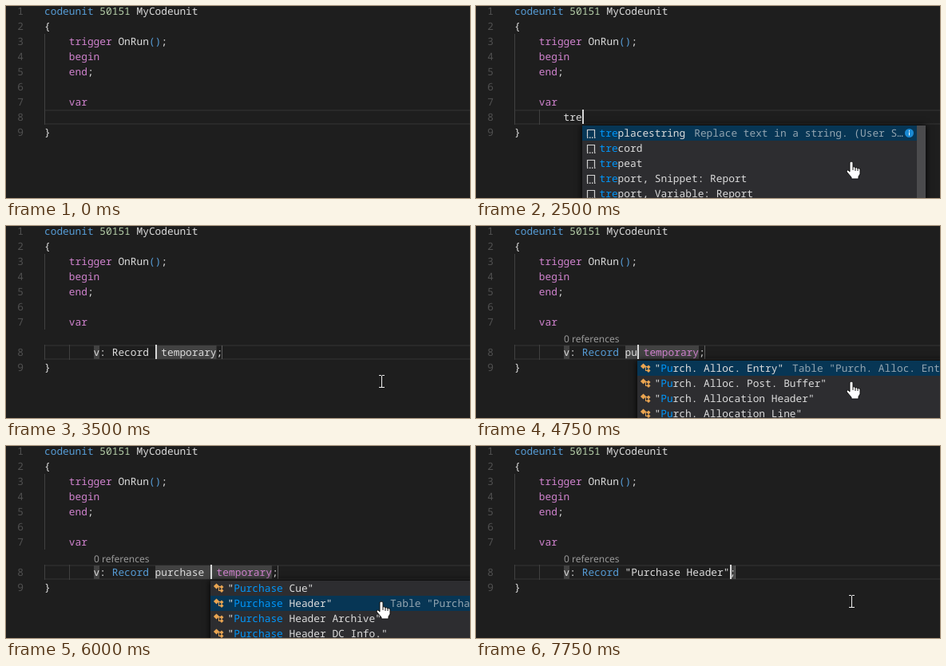
Animation, 581 px wide and 241 px high, one loop 8 s. Source, as an HTML page with a canvas:

```html
<!DOCTYPE html>
<html lang="en">
<head>
<meta charset="utf-8">
<title>Code editor snippet</title>
<style>
html, body { margin: 0; width: 100%; height: 100%; overflow: hidden; background: #1e1e1e; }
canvas { display: block; width: 581px; height: 241px; }
</style>
</head>
<body>
<canvas id="stage"></canvas>
<script>
const W = 581, H = 241, LOOP = 8000, STEP = 250;
const CHAR = 7.7, LEFT = 48, ROW = 19;
const MONO = '12.83px "Noto Sans Mono", "DejaVu Sans Mono", monospace';
const SANS = '12px "Noto Sans", "Open Sans", sans-serif';
const C = {
  bg: '#1e1e1e', text: '#dcdcdc', blue: '#569cd6', pink: '#d183cf', num: '#b5cea8',
  gutter: '#505050', guide: '#404040', line: '#292929', stop: '#424242',
  popup: '#2d2d30', pick: '#073655', match: '#0097fb', detail: '#93a5b1'
};

const canvas = document.getElementById('stage');
const ctx = canvas.getContext('2d');
const ratio = window.devicePixelRatio || 1;
canvas.width = W * ratio;
canvas.height = H * ratio;
ctx.scale(ratio, ratio);

const colX = col => LEFT + col * CHAR;
const rowY = n => ROW * (n - 1) - 3;

function rect(x, y, w, h, color) {
  ctx.fillStyle = color;
  ctx.fillRect(x, y, w, h);
}

function text(str, x, y, color, font = MONO) {
  ctx.font = font;
  ctx.fillStyle = color;
  ctx.fillText(str, x, y);
}

// Draws [string, color] runs on the character grid.
function runs(parts, x, y) {
  for (const [str, color] of parts) {
    text(str, x, y, color);
    x += str.length * CHAR;
  }
}

const snippets = [
  ['treplacestring', 'Replace text in a string. (User S…'],
  ['trecord'], ['trepeat'], ['treport, Snippet: Report'], ['treport, Variable: Report']
];
const keywords = [['var'], ['Variant'], ['Version'], ['Visible']];
const quoted = names => names.map(n => [`"${n}"`, `Table "${n}"`]);
const alloc = quoted(['Purch. Alloc. Entry', 'Purch. Alloc. Post. Buffer',
  'Purch. Allocation Header', 'Purch. Allocation Line']);
const purchase = quoted(['Purchase Cue', 'Purchase Header',
  'Purchase Header Archive', 'Purchase Header DC Info.']);

const typed = (str, items) => ({ word: str, caret: 8 + str.length, popup: { items, match: str.length } });
const record = o => ({ name: 'v', table: '', tail: ' temporary', moved: true, tinted: true, ...o });
const search = (str, items, pick = 0) => record({
  table: str, caret: 18 + str.length, lens: true, stop: true,
  popup: { items, match: str.length, pick, skip: 1, table: true }
});
const HEADER = '"Purchase Header"';
const done = o => record({ table: HEADER, caret: 18 + HEADER.length, lens: true, ...o });

const timeline = [
  [0, { word: '' }],
  [2250, typed('tr', snippets)],
  [2500, typed('tre', snippets)],
  [2750, record({ name: '', caret: 8, tinted: false, stop: true })],
  [3250, record({ caret: 9, tinted: false, stop: true, popup: { items: keywords, match: 1 } })],
  [3500, record({ caret: 18, tinted: false, stop: true })],
  [3750, record({ caret: 18, stop: true })],
  [4000, record({ stop: true })],
  [4500, search('p', alloc)],
  [4750, search('pu', alloc)],
  [5000, search('pur', alloc)],
  [5250, search('purc', alloc)],
  [5500, search('purch', alloc)],
  [5750, search('purchase ', purchase)],
  [6000, search('purchase ', purchase, 1)],
  [6250, done({ stop: true })],
  [6500, done({ caret: 45, select: true })],
  [7250, done({ tail: '' })]
];

function drawCode() {
  const t = C.text;
  const lines = [
    [0, ['codeunit ', C.blue], ['50151 ', C.num], ['MyCodeunit', t]],
    [0, ['{', t]],
    [4, ['trigger ', C.pink], ['OnRun', t], ['()', C.blue], [';', t]],
    [4, ['begin', C.pink]],
    [4, ['end', C.pink], [';', t]],
    [0],
    [4, ['var', C.pink]]
  ];
  lines.forEach(([col, ...parts], i) => {
    const y = rowY(i + 1) + 14;
    text(String(i + 1), 14.3, y, C.gutter);
    runs(parts, colX(col), y);
  });
  rect(48, rowY(3), 1, ROW * 5, C.guide);
}

function drawRecord(s, y) {
  const { name, table, tail } = s;
  const start = 18 - (name ? 0 : 1);
  const end = colX(start + table.length + tail.length);
  const from = Math.round(colX(start));
  if (name) rect(110, y + 1, 7, 17, C.stop);
  if (s.stop) rect(from, y + 1, end - from, 17, C.stop);
  if (s.select) rect(colX(start + table.length), y + 1, tail.length * CHAR, 17, '#264f78');
  if (!tail) rect(end + 1, y + 1, CHAR - 1, 17, C.stop);
  rect(Math.round(end + CHAR) - 1, y + 1, 1, 17, '#606060');
  runs([
    [name + ': ', C.text], ['Record ', s.tinted ? C.blue : C.text], [table, C.text],
    [tail, s.tinted ? C.pink : C.text], [';', C.text]
  ], colX(8), y + 14);
}

function snippetIcon(x, y) {
  ctx.strokeStyle = '#d0d0d0';
  ctx.lineWidth = 1.2;
  ctx.beginPath();
  ctx.moveTo(x, y + 9);
  ctx.lineTo(x, y);
  ctx.lineTo(x + 9, y);
  ctx.lineTo(x + 9, y + 9);
  ctx.stroke();
  for (let i = 0; i < 4; i++) rect(x + i * 3 - 0.5, y + 9, 1.5, 1.5, '#d0d0d0');
}

function diamond(x, y, r, color) {
  ctx.fillStyle = color;
  ctx.beginPath();
  ctx.moveTo(x - r, y);
  ctx.lineTo(x, y - r);
  ctx.lineTo(x + r, y);
  ctx.lineTo(x, y + r);
  ctx.fill();
}

function tableIcon(x, y) {
  const color = '#e8a451';
  diamond(x + 3.5, y - 2, 3.6, color);
  rect(x + 5, y - 2, 4, 1, color);
  rect(x + 6, y - 2, 1, 6, color);
  rect(x + 6, y + 3, 3, 1, color);
  diamond(x + 10, y - 1, 2.5, color);
  diamond(x + 10, y + 3.5, 2.5, color);
}

function drawPopup({ items, match, pick = 0, skip = 0, table }, x, y) {
  ctx.save();
  ctx.shadowColor = '#000';
  ctx.shadowBlur = 8 * ratio;
  rect(x, y, 430, items.length * ROW + (table ? ROW : 0), C.popup);
  ctx.restore();
  items.forEach(([label, detail], i) => {
    const top = y + i * ROW, base = top + 14;
    if (i === pick) rect(x, top, 419, ROW, C.pick);
    if (table) tableIcon(x + 4, top + 9);
    else snippetIcon(x + 6.5, top + 5.5);
    runs([
      [label.slice(0, skip), C.text],
      [label.slice(skip, skip + match), C.match],
      [label.slice(skip + match), C.text]
    ], x + 21.5, base);
    if (i === pick && detail) {
      text(detail, x + 402 - detail.length * CHAR, base, C.detail);
      ctx.fillStyle = '#1b8ad3';
      ctx.beginPath();
      ctx.arc(x + 409.5, top + 9.5, 5.5, 0, Math.PI * 2);
      ctx.fill();
      rect(x + 409, top + 6, 1, 1.5, '#fff');
      rect(x + 409, top + 8.5, 1, 4, '#fff');
    }
  });
  rect(x + 419, y, 11, H, '#4b4b4d');
}

function drawBeam(x, y) {
  rect(x, y - 7, 1, 15, '#f0f0f0');
  for (const edge of [-8, 7]) {
    rect(x - 3, y + edge, 3, 1, '#f0f0f0');
    rect(x + 1, y + edge, 3, 1, '#f0f0f0');
  }
}

function drawHand(x, y) {
  const hand = new Path2D('M-2 1Q0-1 2 1V7Q4 6 5 8Q7 7 8 9Q10 8 11 10V16L9 19V22H0V20L-6 13Q-6 10-4 11L-2 13Z');
  ctx.save();
  ctx.translate(x, y);
  ctx.fillStyle = '#fff';
  ctx.strokeStyle = '#111';
  ctx.lineWidth = 1;
  ctx.fill(hand);
  ctx.stroke(hand);
  ctx.stroke(new Path2D('M2 7V11M5 8V12M8 9V12'));
  ctx.restore();
}

function drawMouse(t, hover) {
  if (t < 750) return;
  const p = Math.min(1, (t - 750) / 1000);
  const k = p * p * (3 - 2 * p);
  const x = Math.round(99 + 371 * k), y = Math.round(123 + 72 * k);
  if (hover) drawHand(x, y);
  else drawBeam(x, y);
}

function draw(time) {
  const t = Math.floor(time / STEP) * STEP;
  const s = timeline.filter(([at]) => at <= t).pop()[1];
  const y = rowY(s.moved ? 9 : 8);

  ctx.textRendering = 'geometricPrecision';
  rect(0, 0, W, H, C.bg);
  drawCode();
  rect(49, y, W - 49, 2, C.line);
  rect(49, y + 17, W - 49, 2, C.line);
  rect(48, y, 1, ROW, C.guide);
  if (s.moved || s.word) rect(79, y, 1, ROW, C.guide);
  text('8', 14.3, y + 14, C.gutter);
  text('9', 14.3, y + ROW + 14, C.gutter);
  text('}', LEFT, y + ROW + 14, C.text);

  if (s.lens) text('0 references', 110, 146, '#999', SANS);
  if (s.moved) drawRecord(s, y);
  else text(s.word, colX(8), y + 14, C.text);

  if (s.caret) {
    const x = Math.round(colX(s.caret));
    if (s.popup) drawPopup(s.popup, x, y + ROW + (s.moved ? 1 : 1));
    rect(x, y, 2, ROW - 1, '#d8d8d8');
  }
  drawMouse(t, s.popup);
}

function tick(now) {
  draw(now % LOOP);
  requestAnimationFrame(tick);
}
requestAnimationFrame(tick);
</script>
</body>
</html>
```
